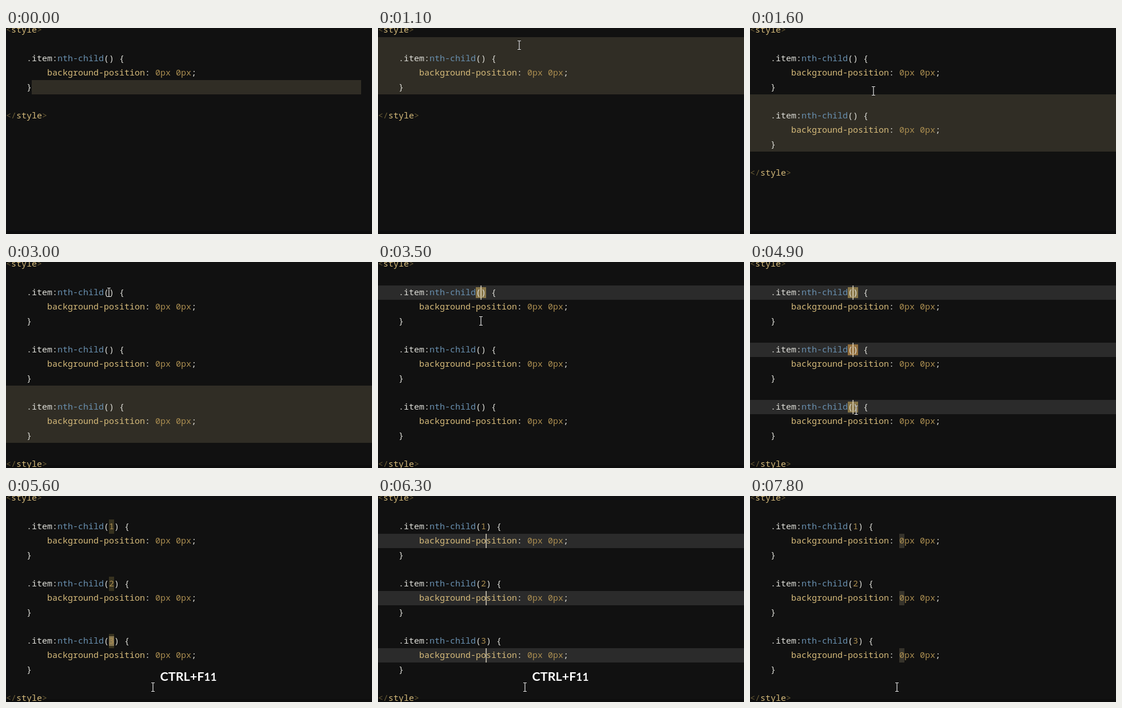
These frames come from a looping animation (640x360 px, 8 s). An HTML page:

```html
<!DOCTYPE html>
<html lang="en">
<head>
<meta charset="utf-8">
<title>Multi-caret editing</title>
<style>
  html, body { margin: 0; width: 100%; height: 100%; overflow: hidden; background: #111; }
  svg { display: block; width: 100vw; height: 100vh; }
  text { font: 15px "Noto Sans Mono", "DejaVu Sans Mono", monospace; white-space: pre; fill: #deded8; }
  .tag { fill: #6a5c36; }
  .name { fill: #d6bb7b; }
  .pseudo { fill: #6990b0; }
  .value { fill: #aa8d50; }
  .caption { font: 700 21.5px Lato, "Open Sans", sans-serif; fill: #fff; text-anchor: middle; }
</style>
</head>
<body>
<svg id="stage" viewBox="0 0 640 360"></svg>
<script>
const stage = document.getElementById('stage');
const LOOP = 8000, STEP = 100, CH = 9, ROW = 25;
const SELECTION = '#302d25', ACTIVE = '#2b2b2b', CARET = '#f3ead2';

// Mouse path: time, x, y
const path = [
  [0, 665, 103], [100, 665, 103], [900, 247, 30], [1200, 247, 30], [1800, 205, 138],
  [2300, 180, 53], [3300, 180, 53], [3700, 180, 153], [3900, 180, 153],
  [4100, 184, 227], [4300, 180, 253], [4800, 180, 253], [5400, 257, 334], [LOOP, 257, 334]
];

const rect = (x, y, w, h, fill) =>
  `<rect x="${x}" y="${y}" width="${w}" height="${h}" fill="${fill}"/>`;
const span = (cls, s) => `<tspan class="${cls}">${s}</tspan>`;
const line = (x, mid, s) => `<text x="${x}" y="${mid + 5}">${s}</text>`;
const rowTop = i => 41 + 100 * i;
const clamp = v => Math.max(0, Math.min(1, v));
const each = (n, fn) => Array.from({ length: n }, (_, i) => fn(i)).join('');

function mouseAt(t) {
  const i = path.findIndex(p => p[0] > t);
  const [t0, x0, y0] = path[i - 1], [t1, x1, y1] = path[i];
  const k = (t - t0) / (t1 - t0), e = k * k * (3 - 2 * k);
  return [x0 + (x1 - x0) * e, y0 + (y1 - y0) * e];
}

function rule(i, numbered) {
  const y = rowTop(i) + 12;
  const arg = numbered ? span('value', i + 1) : '';
  return line(36, y, `.item:${span('pseudo', 'nth-child')}(${arg}) {`)
    + line(72, y + ROW, `${span('name', 'background-position')}: ${span('value', '0px 0px')};`)
    + line(36, y + 2 * ROW, '}');
}

function tag(y, open) {
  return line(0, y, span('tag', open) + span('name', 'style') + span('tag', '&gt;'));
}

// Selection dragged upwards from the line below the rule
function dragSelection(mouseY) {
  const ends = [0, 23 * CH, 37 * CH, 5 * CH];
  const first = Math.max(0, Math.min(3, Math.floor((mouseY - 16) / ROW)));
  const right = first === 3 ? 621 : 640;
  let out = '';
  for (let r = first; r < 4; r++) {
    const x = r === first ? ends[r] : 0;
    out += rect(x, 16 + r * ROW, right - x, ROW, SELECTION);
  }
  return out;
}

function ibeam([x, y]) {
  const shape = `M${x - 3} ${y - 7.5}h2.5l.5 .5l.5 -.5h2.5M${x} ${y - 7}v14M${x - 3} ${y + 7.5}h2.5l.5 -.5l.5 .5h2.5`;
  return `<path d="${shape}" fill="none" stroke="#000" stroke-width="2.4" opacity=".5"/>`
    + `<path d="${shape}" fill="none" stroke="#eee" stroke-width="1.2"/>`;
}

function scene(t) {
  const mouse = mouseAt(t);
  const copies = t < 1400 ? 1 : t < 1700 ? 2 : 3;
  const numbered = t >= 5400;
  let back = rect(0, 0, 640, 360, '#111') + rect(0, 355, 640, 5, '#0d0d0d');
  let front = '';

  const carets = (n, x, down) => {
    back += each(n, i => rect(0, rowTop(i) + down, 640, ROW, ACTIVE));
    if (t < 7100 || t >= 7300)
      front += each(n, i => rect(x - .5, rowTop(i) + down, 1.3, ROW, CARET));
  };

  if (t < 1000) back += dragSelection(mouse[1]);
  else if (t < 3100) back += rect(0, 16 + 100 * (copies - 1), 640, 100, SELECTION);
  else if (t < 5400) {
    const n = t < 3900 ? 1 : t < 4300 ? 2 : 3;
    carets(n, 180, 0);
    back += each(n, i => rect(171, rowTop(i) + 3, 18, 19, i === 1 ? '#93703f' : '#877548'));
  } else if (t < 6000) {
    back += each(3, i => rect(180, rowTop(i), CH, ROW, '#37321f'));
    if (t < 5700) back += rect(180, rowTop(2) + 4, CH, 17, '#85754f');
  } else if (t < 6200) carets(3, 189, 0);
  else if (t < 7500) carets(3, Math.min(270, 189 + 2 * CH * Math.max(0, (t - 6300) / STEP)), ROW);
  else back += each(3, i => rect(261, rowTop(i) + ROW, CH, ROW, '#36332b'));

  const code = tag(3, '&lt;') + each(copies, i => rule(i, numbered)) + tag(53 + 100 * copies, '&lt;/');
  const alpha = Math.min(clamp((t - 5200) / 300), clamp((6800 - t) / 300));
  const caption = alpha > 0
    ? `<text class="caption" x="319" y="323" opacity="${alpha}">CTRL+F<tspan font-size="19" style="font-size:19px">11</tspan></text>`
    : '';
  return back + code + front + caption + ibeam(mouse);
}

let shown = -1;
function tick() {
  const t = Math.floor(performance.now() % LOOP / STEP) * STEP;
  if (t !== shown) stage.innerHTML = scene(shown = t);
  requestAnimationFrame(tick);
}
tick();
</script>
</body>
</html>
```
